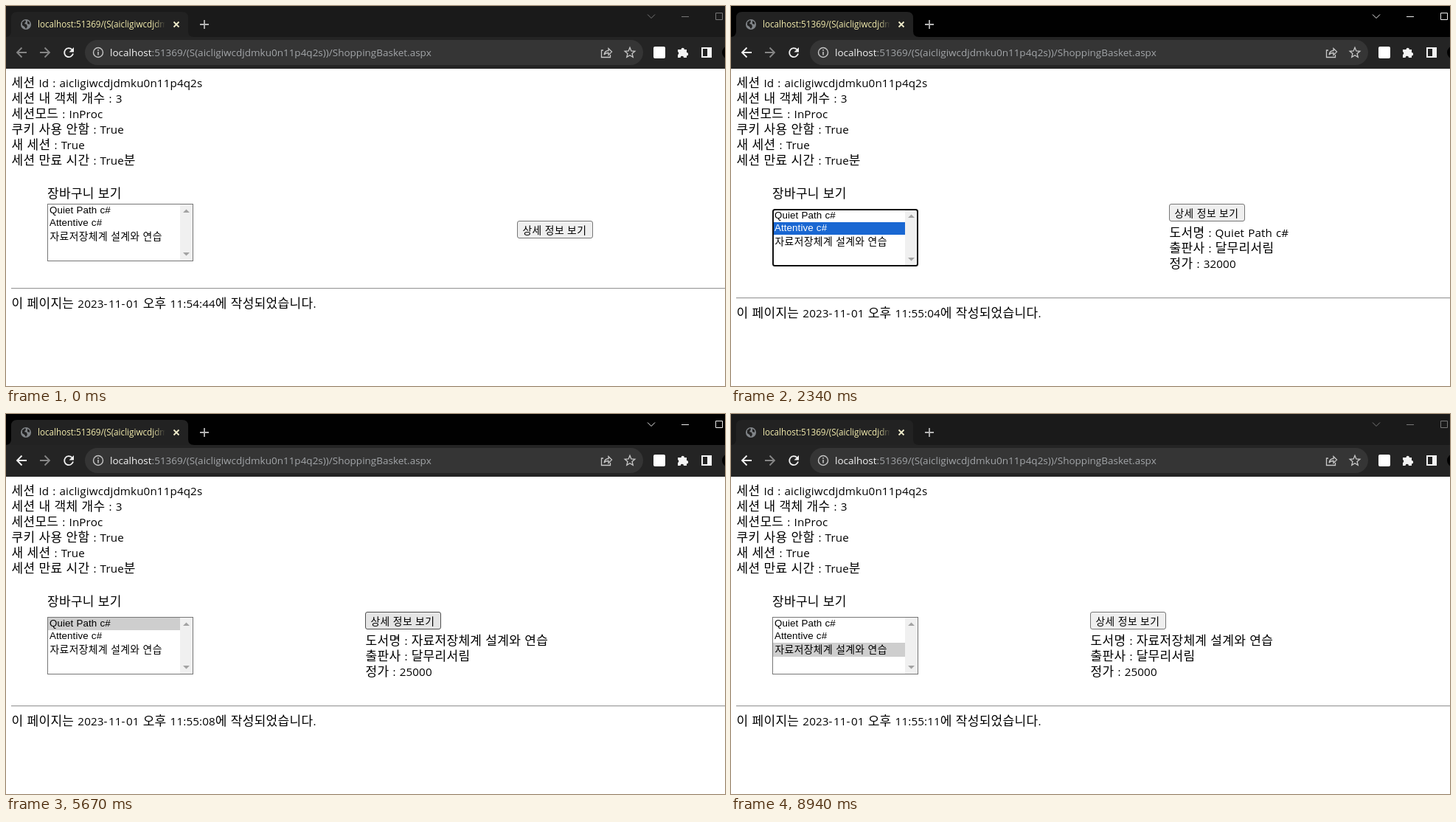
Recreate the animation shown at these times as an HTML page. Size 975 by 515 pixels, loop 9030 ms.

```html
<!DOCTYPE html>
<html lang="ko">
<head>
<meta charset="utf-8">
<title>ShoppingBasket</title>
<style>
  html, body { margin: 0; width: 100%; height: 100%; overflow: hidden; background: #fff; }
  svg { display: block; width: 975px; height: 515px; }
  text { white-space: pre; }
  .ui { font-family: "Open Sans", "Noto Sans", sans-serif; }
  .lat { font: 15.2px "Open Sans", "Noto Sans", sans-serif; letter-spacing: .12px; word-spacing: 1px; }
  .dash { letter-spacing: 1.5px; }
  .han { font: 17px "Noto Sans CJK KR", "Noto Sans CJK", sans-serif; letter-spacing: .3px; }
  .small .lat { font: 13.333px "Liberation Sans", Arial, sans-serif; letter-spacing: .1px; word-spacing: .3px; }
  .small .han { font-size: 13.8px; letter-spacing: .4px; }
  .line { fill: none; stroke-width: 1.8; }
</style>
</head>
<body>
<svg viewBox="0 0 975 515">
  <defs>
    <linearGradient id="fade" gradientUnits="userSpaceOnUse" x1="200" x2="216" y1="0" y2="0">
      <stop stop-color="#f3ecad"/>
      <stop offset="1" stop-color="#f3ecad" stop-opacity="0"/>
    </linearGradient>
  </defs>

  <!-- tab strip -->
  <rect id="strip" width="975" height="42"/>
  <path fill="#222" d="M-1 42Q7 42 7 34V16Q7 8 15 8H239Q247 8 247 16V34Q247 42 255 42Z"/>
  <g id="globe">
    <circle cx="27" cy="25" r="7" fill="#808488"/>
    <path fill="#222" d="M22 22l4-3 1 2-2 3 3 1 1 3-2 3-2-3-3-2zM29 20l3 2 0 3-3-1z"/>
  </g>
  <path id="spin" class="line" stroke="#9aa0a6" d="M27 18.5A6.5 6.5 0 0 0 27 31.5"/>
  <text class="ui" x="43" y="29" font-size="11.7" fill="url(#fade)">localhost:51369/(S(aicligiwcdjdmku0n11p4q2s</text>
  <path class="line" stroke="#f0eccb" d="M227.5 21.5l7 7m0-7l-7 7"/>
  <path class="line" stroke="#b4b4b4" d="M263 25h12m-6-6v12"/>
  <path id="win" fill="none" d="M870 11.5l5 5 5-5M916 14.5h10M962.500 9.500h9v9h-9z"/>

  <!-- toolbar -->
  <rect y="42" width="975" height="43" fill="#242424"/>
  <rect x="107" y="46" width="757" height="34" rx="17" fill="#353535"/>
  <path id="back" class="line" d="M28 63H15m6.500-6.500L15 63l6.500 6.500"/>
  <path class="line" stroke="#858585" d="M46 63h13m-6.500-6.500L59 63l-6.500 6.500"/>
  <path class="line" stroke="#f0f0f0" stroke-width="2" d="M89.500 59A6 6 0 1 0 91 64.500"/>
  <path fill="#f0f0f0" d="M92 56v6.500h-6.500z"/>
  <circle cx="125" cy="63" r="6.500" fill="none" stroke="#c4c4c4" stroke-width="1.400"/>
  <path stroke="#c4c4c4" stroke-width="1.600" d="M125 62v4.500M125 59v1.700"/>
  <text class="ui" x="141" y="68" font-size="13.500" fill="#a2a5a8"><tspan fill="#f4f4f4">localhost</tspan>:51369/(S(aicligiwcdjdmku0n11p4q2s))/ShoppingBasket.aspx</text>
  <g fill="none" stroke="#c8c8c8" stroke-width="1.300">
    <path d="M810 60h-2.500v9.500h12V66M811 66q1-5.500 6-5.500v-3l4.500 4.500-4.500 4.500v-3q-4 0-6 2.500z"/>
    <path id="star"/>
  </g>
  <rect x="878" y="55" width="16" height="16" rx="2" fill="#fff"/>
  <path fill="#f4f4f4" d="M911 59h4.500a2.200 2.200 0 1 1 4.400 0H923v4a2.200 2.200 0 1 1 0 4.400V70h-4a2.200 2.200 0 0 0-4.400 0H911v-4a2.200 2.200 0 0 0 0-4z"/>
  <path fill="#f4f4f4" fill-rule="evenodd" d="M943 56h14v14h-14zM945 58v10h6V58z"/>
  <circle cx="980" cy="63" r="9" fill="#000"/>

  <!-- page -->
  <rect y="85" width="975" height="430" fill="#fff"/>
  <g id="info"></g>
  <g id="list" class="small">
    <rect x="56" width="198" height="78" fill="#fff"/>
    <rect id="mark" width="179"/>
    <rect x="236" y="1" width="17" height="76" fill="#f0f0f0"/>
    <path fill="#a3a3a3" d="M240 12h9l-4.500-4.500zM240 66h9l-4.500 4.500z"/>
    <rect id="ring" fill="none"/>
    <g id="rows"></g>
  </g>
  <g id="button" class="small">
    <rect id="face" x=".5" y=".5" width="102" height="23" rx="2.500"/>
  </g>
  <g id="detail"></g>
  <g id="foot">
    <rect x="7" width="968" height="1" fill="#9a9a9a"/>
    <rect x="7" y="1" width="968" height="1" fill="#eee"/>
  </g>
</svg>
<script>
const LOOP = 9030;
const $ = id => document.getElementById(id);
const set = (id, attrs) => { for (const k in attrs) $(id).setAttribute(k, attrs[k]); };
const show = (id, on) => set(id, { display: on ? 'inline' : 'none' });

// Splits a string into Hangul, dash and Latin runs, each with its own font.
function write(el, str) {
  el.innerHTML = str.match(/[가-힣]+|-|[^가-힣-]+/g).map(run => {
    const kind = /[가-힣]/.test(run) ? 'han' : run === '-' ? 'lat dash' : 'lat';
    return `<tspan class="${kind}">${run}</tspan>`;
  }).join('');
}
function addText(parent, x, y, str) {
  const el = document.createElementNS('http://www.w3.org/2000/svg', 'text');
  el.setAttribute('x', x);
  el.setAttribute('y', y);
  write(el, str);
  return $(parent).appendChild(el);
}

const books = [
  { title: 'Quiet Path c#', price: 32000, x: 594 },
  { title: 'Attentive c#', price: 20000, x: 615 },
  { title: '자료저장체계 설계와 연습', price: 25000, x: 487 }
];
const rowTop = [1, 18, 35, 54];
const faces = [['#efefef', '#767676'], ['#e5e5e5', '#4f4f4f'], ['#f5f5f5', '#8d8d8d']];

['세션 Id : aicligiwcdjdmku0n11p4q2s', '세션 내 객체 개수 : 3', '세션모드 : InProc',
 '쿠키 사용 안함 : True', '새 세션 : True', '세션 만료 시간 : True분']
  .forEach((s, i) => addText('info', 7.5, 110 + 21 * i, s));
addText('info', 56, 260, '장바구니 보기');
const rows = books.map((b, i) => addText('rows', i < 2 ? 59 : 59.5, [13, 30, 49][i], b.title));
addText('button', 7.5, 17.5, '상세 정보 보기');
const lines = [45, 66, 87].map(y => addText('detail', 0.5, y, ' '));
const stamp = addText('foot', 7.5, 27, ' ');

let star = '';
for (let i = 0; i < 10; i++) {
  const r = i % 2 ? 3.2 : 7.2, a = Math.PI * (i / 5 - .5);
  star += (i ? 'L' : 'M') + (846 + r * Math.cos(a)).toFixed(2) + ' ' + (63.5 + r * Math.sin(a)).toFixed(2);
}
set('star', { d: star + 'Z' });

const pick = sel => ({ sel, focus: 1 });
const hover = { btn: 1 }, press = { btn: 2, focus: 0 }, wait = { btn: 1, load: 1 };
const result = (book, clock) => ({ book, clock: '11:55:' + clock, btn: 0, load: 0 });
const steps = [
  [0, { active: 0, sel: -1, focus: 0, book: -1, btn: 0, load: 0, clock: '11:54:44' }],
  [660, { active: 1, ...pick(0) }],
  [1080, hover], [1140, press], [1200, hover], [1260, wait], [1320, result(0, '04')],
  [2340, pick(1)], [2760, { focus: 0 }],
  [2970, hover], [3030, press], [3120, hover], [3180, wait], [3240, result(1, '06')],
  [3780, pick(2)],
  [4170, hover], [4380, press], [4440, wait], [4470, result(2, '08')],
  [4650, hover], [4710, { btn: 0 }],
  [5160, pick(0)],
  [5490, hover], [5580, press], [5670, hover], [5730, result(0, '09')],
  [6150, pick(1)],
  [6480, hover], [6540, press], [6600, wait], [6660, result(1, '10')],
  [7110, pick(2)],
  [7380, hover], [7500, press], [7620, result(2, '11')],
  [8940, { active: 0 }]
];

function draw(s) {
  const book = books[s.book], sel = s.sel;
  set('strip', { fill: s.active ? '#010101' : '#1a1a1a' });
  set('win', { stroke: s.active ? '#ececec' : '#777' });
  set('back', { stroke: book ? '#f4f4f4' : '#858585' });
  show('globe', !s.load);
  show('spin', s.load);

  set('list', { transform: `translate(0 ${book ? 275 : 268})` });
  show('mark', sel >= 0);
  if (sel >= 0) set('mark', {
    x: 57, y: rowTop[sel], height: rowTop[sel + 1] - rowTop[sel],
    fill: s.focus ? '#1967d2' : '#cecece'
  });
  set('ring', s.focus
    ? { x: 57, y: 1, width: 196, height: 76, rx: 2.5, stroke: '#101010', 'stroke-width': 2 }
    : { x: 56.5, y: .5, width: 197, height: 77, rx: 0, stroke: '#767676', 'stroke-width': 1 });
  rows.forEach((row, i) => row.setAttribute('fill', s.focus && i === sel ? '#fff' : '#000'));

  const [fill, stroke] = faces[s.btn];
  set('face', { fill, stroke });
  set('button', { transform: book ? `translate(${book.x} 268)` : 'translate(693 291)' });
  show('detail', book);
  if (book) {
    set('detail', { transform: `translate(${book.x} 268)` });
    ['도서명 : ' + book.title, '출판사 : 달무리서림', '정가 : ' + book.price]
      .forEach((str, i) => write(lines[i], str));
  }
  set('foot', { transform: `translate(0 ${book ? 395 : 382})` });
  write(stamp, `이 페이지는 2023-11-01 오후 ${s.clock}에 작성되었습니다.`);
}

let start, last = -1;
function tick(now) {
  start ??= now;
  const t = (now - start) % LOOP;
  const past = steps.filter(step => step[0] <= t);
  if (past.length !== last) {
    last = past.length;
    draw(Object.assign({}, ...past.map(step => step[1])));
  }
  requestAnimationFrame(tick);
}
draw(steps[0][1]);
requestAnimationFrame(tick);
</script>
</body>
</html>
```
